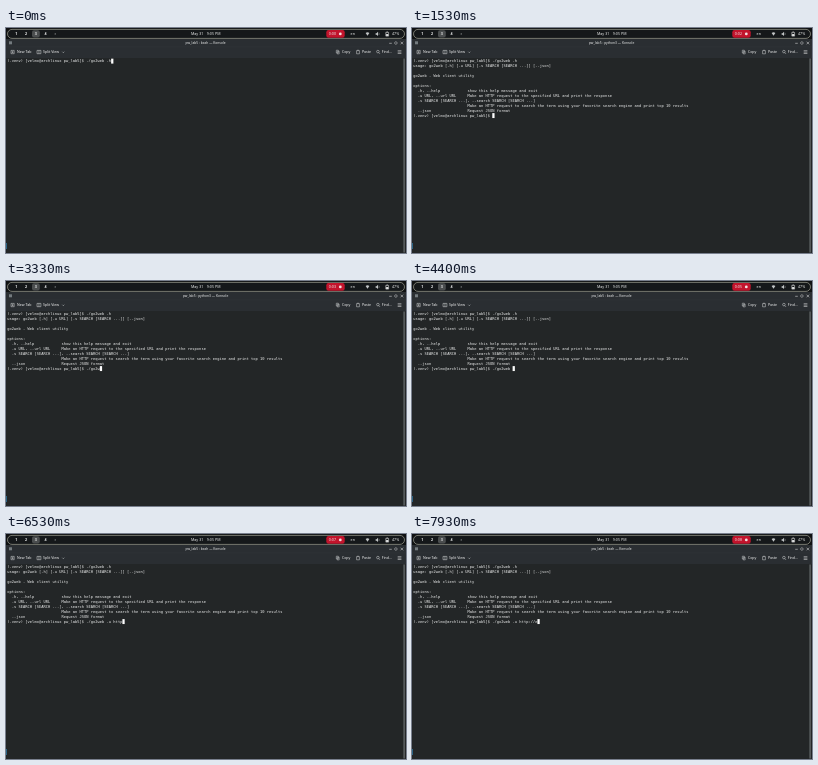
Animation of 400 by 225 pixels, one loop 8000 ms. Source, as an HTML page with a canvas:

```html
<!DOCTYPE html>
<html lang="en">
<head>
<meta charset="utf-8">
<title>Terminal session</title>
<style>
html, body { margin: 0; width: 100%; height: 100%; overflow: hidden; background: #0b0d0c; }
canvas { display: block; width: 400px; height: 225px; }
</style>
</head>
<body>
<canvas id="stage"></canvas>
<script>
const LOOP = 8000;
const CELL = 2.257, ROW = 4.95, LEFT = 1.3, TOP = 30.65;
const MONO = '"DejaVu Sans Mono", monospace';
const SANS = '"Noto Sans", sans-serif';
const INK = '#eeefef', DIM = '#c3c6c7', TERMINAL = '#232627', CHROME = '#2a2e32';

const ENTER = 1200, OUTPUT = 1530, BASH_BACK = 3400;
const PROMPT = '(.venv) [velmo@archlinux pw_lab5]$ ';
const COMMAND = './go2web -u http://e';
const KEY_TIMES = [2000, 2070, 2330, 2470, 2670, 3330, 3400, 3600, 3730, 4800,
  5070, 5200, 6130, 6270, 6330, 6530, 7270, 7530, 7730, 7930];
const TICKS = [330, 1330, 2330, 3400, 4400, 5400, 6400, 7400];
const option = (flags, help) => ('  ' + flags).padEnd(24) + help;
const HELP = [
  'usage: go2web [-h] [-u URL] [-s SEARCH [SEARCH ...]] [--json]',
  '',
  'go2web - Web client utility',
  '',
  'options:',
  option('-h, --help', 'show this help message and exit'),
  option('-u URL, --url URL', 'Make an HTTP request to the specified URL and print the response'),
  option('-s SEARCH [SEARCH ...], --search SEARCH [SEARCH ...]', ''),
  option('', 'Make an HTTP request to search the term using your favorite search engine and print top 10 results'),
  option('--json', 'Request JSON format')
];

const canvas = document.getElementById('stage');
const ctx = canvas.getContext('2d');
const ratio = window.devicePixelRatio || 1;
canvas.width = 400 * ratio;
canvas.height = 225 * ratio;
ctx.scale(ratio, ratio);

// Text is laid out large and scaled down so that advances stay fractional.
function text(str, x, y, size, { font = SANS, align = 'left', color = INK, weight = 500 } = {}) {
  ctx.save();
  ctx.translate(x, y);
  ctx.scale(0.1, 0.1);
  ctx.font = `${weight} ${size * 10}px ${font}`;
  ctx.textAlign = align;
  ctx.fillStyle = color;
  ctx.fillText(str, 0, 0);
  ctx.restore();
}

function rect(x, y, w, h, color) {
  ctx.fillStyle = color;
  ctx.fillRect(x, y, w, h);
}

function pill(x, y, w, h, r, fill, stroke) {
  ctx.beginPath();
  ctx.roundRect(x, y, w, h, r);
  ctx.fillStyle = fill;
  ctx.fill();
  if (stroke) {
    ctx.strokeStyle = stroke;
    ctx.lineWidth = 0.7;
    ctx.stroke();
  }
}

function dot(x, y, r, color = INK) {
  ctx.beginPath();
  ctx.arc(x, y, r, 0, Math.PI * 2);
  ctx.fillStyle = color;
  ctx.fill();
}

function line(path, width = 0.5, color = INK) {
  ctx.strokeStyle = color;
  ctx.lineWidth = width;
  ctx.stroke(new Path2D(path));
}

function fill(path, color = INK) {
  ctx.fillStyle = color;
  ctx.fill(new Path2D(path));
}

const passed = (times, t) => times.filter(time => time <= t).length;

function drawPanel(t) {
  rect(0, 0, 400, 11, '#0f1112');
  pill(1.5, 1.4, 397, 9, 4.5, '#15181a', '#a3a396');
  pill(26, 2.2, 7.8, 7.2, 2, '#4a4d4e');
  ['1', '2', '3', '4'].forEach((n, i) =>
    text(n, 10.4 + i * 9.7, 7.2, 3.7, { align: 'center', weight: 600 }));
  dot(49.2, 5.9, 0.55, '#a5a8a8');
  text('May 31', 185, 7.2, 3.65);
  text('9:05 PM', 200.8, 7.2, 3.65);

  pill(320.3, 2, 18.4, 7.8, 2.2, '#c2142c');
  text('0:0' + passed(TICKS, t), 322.8, 7.2, 3.6);
  dot(334.3, 5.9, 1.4, '#f4dfe1');
  text('en', 344.6, 7.2, 3.65);

  fill('M359.6 5.1 Q361.5 3.4 363.4 5.1 L361.5 7.7 Z', DIM);
  fill('M369.6 5.2 h1 l1.4 -1.4 v4.3 l-1.4 -1.4 h-1 Z', DIM);
  line('M372.8 4.7 q.8 1.2 0 2.4', 0.45, DIM);
  line('M379.8 4.4 h2.8 v3.7 h-2.8 Z M380.6 3.8 h1.2', 0.55);
  rect(380.1, 6.1, 2.2, 1.8, INK);
  text('47%', 386, 7.2, 3.65);
}

function drawWindowFrame(t) {
  rect(0, 11, 400, 19, CHROME);
  rect(0, 18.8, 400, 0.3, '#34393d');
  rect(3, 13.3, 3, 3, '#747b7f');
  const program = t >= OUTPUT && t < BASH_BACK ? 'python3' : 'bash';
  text(`pw_lab5 : ${program} — Konsole`, 199.6, 16.2, 3.3, { align: 'center' });
  line('M383.2 15.3 h2.6 M388.4 15 l1.5 -1.5 1.5 1.5 -1.5 1.5 Z M394.6 13.7 l2.6 2.6 M397.2 13.7 l-2.6 2.6', 0.5);

  line('M5 22.4 h3.2 v3.3 h-3.2 Z M6.6 23.2 v1.8 M5.7 24.1 h1.8', 0.45);
  text('New Tab', 11, 25.4, 3.6);
  line('M31 22.4 h3.9 v3.3 h-3.9 Z M32.95 22.4 v3.3', 0.45);
  text('Split View', 36.9, 25.4, 3.6);
  line('M56.3 23.7 l1 1 1 -1', 0.45);

  line('M330.3 22.2 h2 v2.7 h-2 Z M331.2 23.2 h2 v2.7 h-2 Z', 0.4);
  text('Copy', 335.9, 25.4, 3.6);
  line('M350.6 22.6 h2.8 v3.2 h-2.8 Z M351.3 22.2 h1.4', 0.45);
  text('Paste', 355.9, 25.4, 3.6);
  line('M373.2 23.6 a1.3 1.3 0 1 0 -2.6 0 a1.3 1.3 0 1 0 2.6 0 M372.8 24.6 l1.2 1.3', 0.45);
  text('Find…', 375.8, 25.4, 3.6);
  line('M391.7 22.7 h3.7 M391.7 24.1 h3.7 M391.7 25.5 h3.7', 0.5);
}

function drawTerminal(t) {
  rect(0, 29.6, 400, 195.4, TERMINAL);
  rect(0, 215, 1, 6, '#2c6688');
  rect(397.5, 30.5, 1.2, 194, '#6b7073');

  const rows = [PROMPT + './go2web -h'];
  if (t >= OUTPUT) {
    rows.push(...HELP, PROMPT + COMMAND.slice(0, passed(KEY_TIMES, t)));
  } else if (t >= ENTER) {
    rows.push('');
  }
  rows.forEach((row, i) =>
    text(row, LEFT, TOP + i * ROW + 3.8, CELL / 0.602, { font: MONO, weight: 400 }));

  const last = rows.length - 1;
  rect(LEFT + rows[last].length * CELL, TOP + last * ROW, CELL, ROW, '#fcfcfc');
}

function draw() {
  const time = Math.max(0, performance.now() - start) % LOOP;
  drawTerminal(time);
  drawWindowFrame(time);
  drawPanel(time);
  requestAnimationFrame(draw);
}

const start = performance.now();
draw();
</script>
</body>
</html>
```
